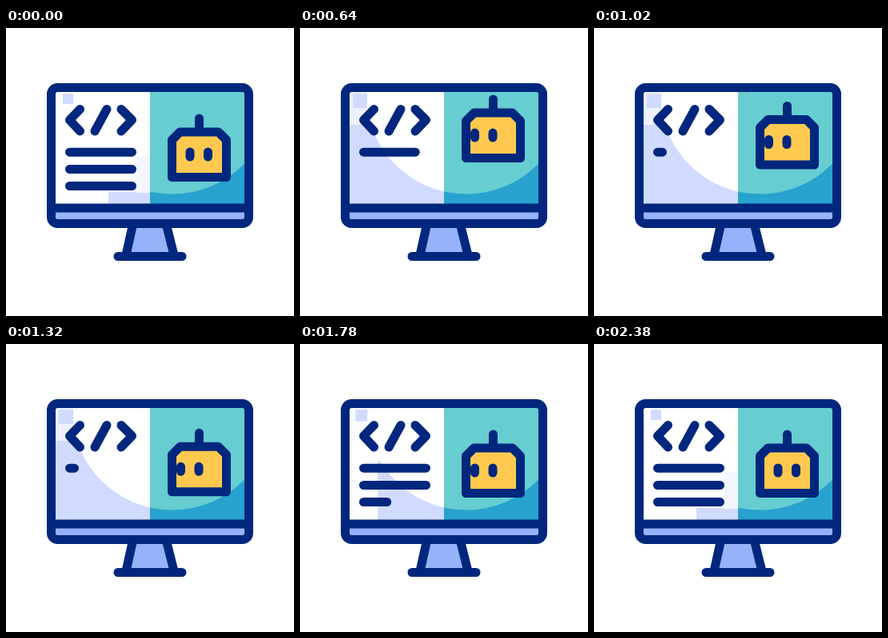
Animation, 360 px wide and 360 px high, one loop 2.4 s. Source, as an HTML page:

```html
<!DOCTYPE html>
<html lang="en">
<head>
<meta charset="utf-8">
<title>Code and bot</title>
<style>
  html, body { margin: 0; width: 100%; height: 100%; overflow: hidden; background: #fff; }
  svg { display: block; width: 100%; height: 100%; }
  .ink { fill: none; stroke: #00277d; stroke-width: 11; stroke-linecap: round; stroke-linejoin: round; }
  .blue { fill: #96b2fb; }
  .lav { fill: #d1dbff; }
</style>
</head>
<body>
<svg viewBox="0 0 360 360">
  <defs>
    <clipPath id="left"><rect x="62" y="80" width="118" height="140"/></clipPath>
    <clipPath id="right"><rect x="180" y="80" width="118" height="140"/></clipPath>
  </defs>

  <g clip-path="url(#left)">
    <rect id="shade" class="lav" height="140"/>
    <circle cx="208" cy="82" r="125.6" fill="#fff"/>
    <rect id="glow" x="163" y="160" width="17" height="46" fill="#f3f6ff"/>
    <rect id="haze" x="62" y="80" width="21" height="41" fill="#eef2ff"/>
    <rect id="corner" class="lav" y="82"/>
  </g>
  <g clip-path="url(#right)">
    <rect x="180" y="80" width="118" height="140" fill="#28a2ce"/>
    <circle cx="208" cy="82" r="125.6" fill="#66cdd1"/>
  </g>

  <rect class="blue" x="60" y="228" width="240" height="15"/>
  <path class="blue" d="M158 248H201L210 285H150Z"/>
  <g class="ink">
    <rect x="56.5" y="74.5" width="247" height="170" rx="8"/>
    <path d="M57 225H303M158 248L150 284M201 248L210 284M140 285.5H220"/>
    <path d="M92.500 101.500L79.500 115L92.500 129M126 101.500L111 129M144 101.500L157.500 115L144 129"/>
    <path class="row"/>
    <path class="row"/>
    <path class="row"/>
  </g>

  <g id="bot">
    <path class="ink" d="M241.500 113V128"/>
    <path class="ink" style="fill:#ffc94f" d="M207.500 140L217.500 130H265.500L275.500 140V186.500H207.500Z"/>
    <path id="eyes" class="ink" d="M230 155V161M252.500 155V161"/>
  </g>
</svg>
<script>
  const LOOP = 2400, ROW = 79, STUB = 7;
  const $ = id => document.getElementById(id);
  const rows = [...document.querySelectorAll('.row')];
  const rowY = [155.2, 176.5, 197.5];

  const clamp = (v, lo, hi) => Math.min(hi, Math.max(lo, v));
  const ramp = (t, from, to) => clamp((t - from) / (to - from), 0, 1);
  const ease = p => (1 - Math.cos(Math.PI * p)) / 2;

  function set(id, attrs) {
    for (const key in attrs) $(id).setAttribute(key, attrs[key]);
  }

  function draw(t) {
    // Text is erased from the last row upwards, then typed again.
    const gone = (3 * ROW - STUB) * (ramp(t, 294, 760) - ramp(t, 1414, 1880));
    rows.forEach((row, i) => {
      const len = ROW - clamp(gone - (2 - i) * ROW, 0, ROW);
      row.setAttribute('d', `M79.5 ${rowY[i]}h${Math.max(0, len - 1)}`);
      row.style.display = len > 0 ? '' : 'none';
    });

    // The panel shading spreads as the text disappears.
    const x = Math.max(62, 128 - 0.63 * gone);
    const full = clamp(gone / 150, 0, 1);
    const patch = 71 - 5 * full;
    set('shade', { x, y: Math.max(120, 205 - 1.2 * gone), width: 180 - x });
    set('glow', { opacity: clamp(1 - gone / 13, 0, 1) });
    set('haze', { opacity: full });
    set('corner', { x: patch, width: 84 - patch, height: 13 + 5 * full });

    const lift = -24.7 * Math.sin(Math.PI * ramp(t, 0, 1440)) ** 2;
    const look = -11.5 * (ease(ramp(t, 400, 560)) - ease(ramp(t, 1850, 2100)));
    set('bot', { transform: `translate(0 ${lift})` });
    set('eyes', { transform: `translate(${look} 0)` });
  }

  const start = performance.now();
  function tick() {
    draw((performance.now() - start) % LOOP);
    requestAnimationFrame(tick);
  }
  draw(0);
  requestAnimationFrame(tick);
</script>
</body>
</html>
```
